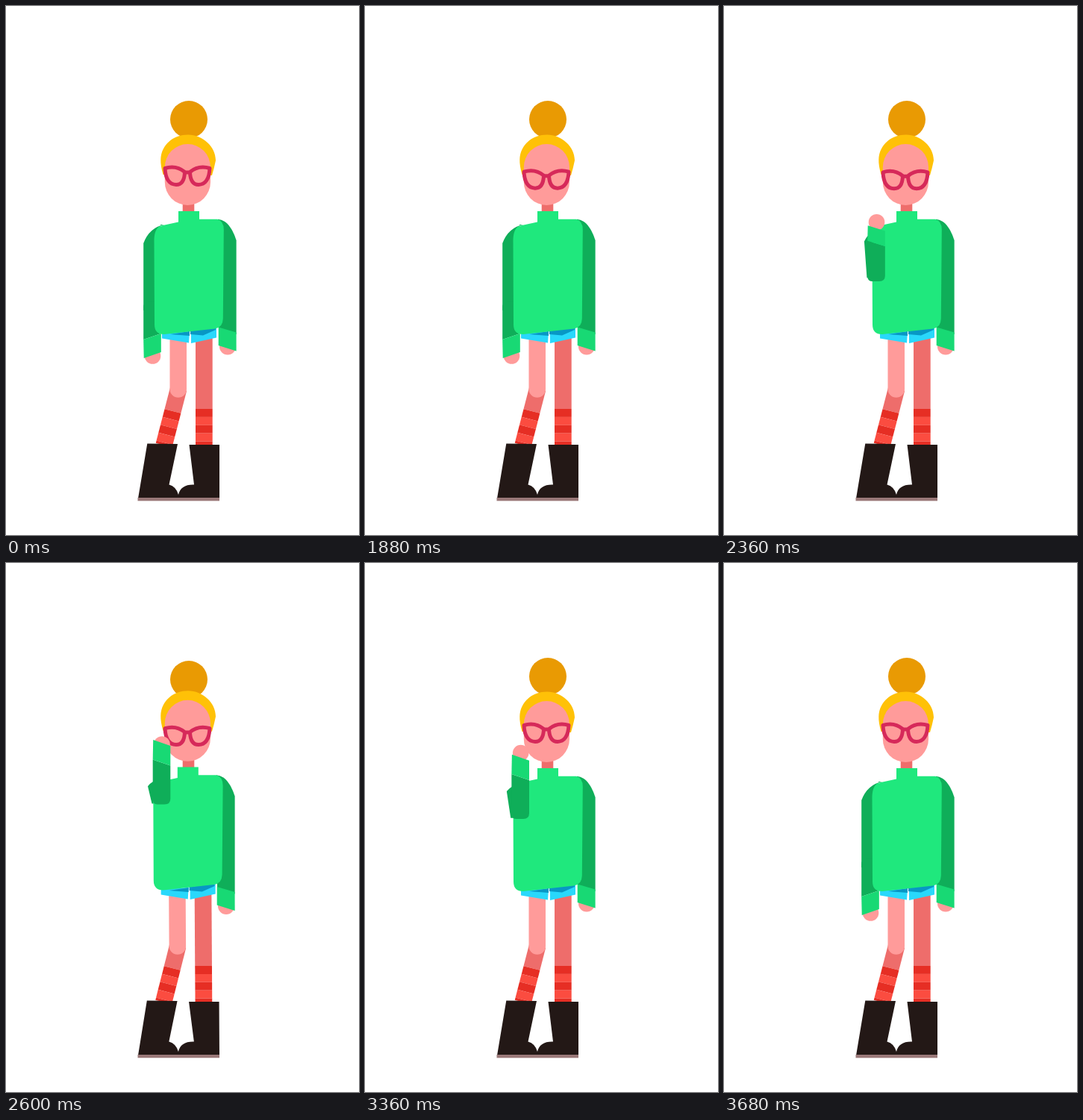
Write an HTML page with a canvas that moves like this. It is 473 px wide and 709 px high and loops after 3.84 s.

```html
<!DOCTYPE html>
<html lang="en">
<head>
<meta charset="utf-8">
<title>Pushing up the glasses</title>
<style>
  html, body { margin: 0; overflow: hidden; background: #fff; }
  canvas { display: block; }
</style>
</head>
<body>
<canvas id="stage" width="473" height="709"></canvas>
<script>
const ctx = document.getElementById('stage').getContext('2d');
const LOOP = 3840, STEP = 40;
const SKIN = '#ff9b9a', SHADE = '#ee6d6b', GREEN = '#1fe87d', DARK = '#0fae59',
      CUFF = '#18d974', RED = '#e62e24', CORAL = '#fb4c40', BOOT = '#231816',
      PINK = '#d6295a', CYAN = '#29d8fb', BLUE = '#0897c4';

const mix = (a, b, k) => a + (b - a) * k;
const clamp = (v, lo, hi) => Math.min(hi, Math.max(lo, v));
const smooth = k => k * k * (3 - 2 * k);
const easeOut = k => 1 - (1 - k) ** 1.8;
const ramp = (t, from, to, ease = smooth) => ease(clamp((t - from) / (to - from), 0, 1));

function fill(color, path) {
  ctx.fillStyle = color;
  ctx.fill(new Path2D(path));
}

function rect(color, x, y, w, h) {
  ctx.fillStyle = color;
  ctx.fillRect(x, y, w, h);
}

function disc(color, x, y, r) {
  ctx.fillStyle = color;
  ctx.beginPath();
  ctx.arc(x, y, r, 0, 7);
  ctx.fill();
}

function shifted(x, y, draw) {
  ctx.save();
  ctx.translate(x, y);
  draw();
  ctx.restore();
}

function sock(x, y, w, end) {
  for (let i = 0; y < end; i++, y += 10.9)
    rect(i % 2 ? CORAL : RED, x, y, w, Math.min(10.9, end - y));
}

// The legs lean about the soles.
function legs(sway) {
  ctx.save();
  const skew = .006 * sway;
  ctx.transform(1, 0, skew, 1, -skew * 663, 0);
  rect(SHADE, 254, 440, 22.7, 100);
  sock(254, 540, 22.7, 590);

  shifted(231.2, 513, () => {
    ctx.rotate(.253);
    rect(SHADE, -11.3, 0, 22.6, 31);
    sock(-11.3, 31, 22.6, 78);
  });
  fill(SKIN, 'M219.5 440H242V513.5A11.25 11.25 0 0 1 219.5 513.5Z');

  shifted(0, -sway, () => {
    fill(CYAN, 'M209 438L246 436L245 451.5L209 445.5ZM248 437L282 431V444.5L248 452Z');
    fill(BLUE, 'M220 440L246 436V442ZM247 435L281 431V434L264 441.5L247 440Z');
  });

  fill(BOOT, 'M189.3 586.5L230 587L218.5 641.5Q228 644 231 655Q234 641 252 641.5' +
    'L245.5 588H286V660H177Z');
  rect('#9a7878', 176.5, 659, 109.5, 4.3);
  ctx.restore();
}

// The forearm swings up towards the viewer: reach is its visible length, +1 down to -1 up.
function armPose(raise, push) {
  const reach = Math.cos(Math.PI * raise);
  const fold = raise ** 2.6;
  const elbow = mix(408, 329.5, fold) - 17.5 * push;
  const along = (down, up) => elbow + reach * (reach > 0 ? down : up);
  return {
    reach, fold, elbow,
    x: mix(196, 208.5, fold),
    start: along(35, 44.5),
    end: along(60, 71) + 6 * Math.sin(Math.PI * raise),
    hand: along(61, 77) + 8 * push,
    slant: -4 * reach
  };
}

function upperArm({ elbow, fold }) {
  const y = mix(318, 305 - (329.5 - elbow) * .33, fold);
  const top = mix(293, y - 9, fold), end = elbow + 10.5 * fold;
  const x = mix(184.2, 190, fold), foot = mix(184.2, 195.5, fold);
  fill(DARK, `M${mix(212, 206, fold)} ${top}Q${mix(192, 196, fold)} ${mix(297, top + 1, fold)}` +
    ` ${x} ${y}L${foot} ${end}H207V${top}Z`);
}

function forearm({ x, elbow, start, end, hand, slant, reach }) {
  const l = x - 11.8, r = x + 11.8;
  const s = clamp(reach * 3.5, -1, 1);
  const front = clamp((.85 - Math.abs(reach)) / .4, 0, 1);
  const tip = elbow - s * 11.5, bend = elbow - s * 4;
  const drawHand = () => disc(SKIN, x + .5, hand, 10.8);

  if (front < .4) drawHand();
  fill(DARK, `M${l} ${start - slant}L${l} ${bend}Q${l} ${tip} ${x - 6} ${tip}` +
    `H${x + 4}Q${r} ${tip} ${r} ${bend}L${r} ${start + slant}Z`);
  fill(CUFF, `M${l} ${start - slant}Q${x} ${start - s * front * 26} ${r} ${start + slant}` +
    `L${r} ${end + slant}L${l + .5} ${end - slant}Z`);
  if (front >= .4) drawHand();
}

function rightArm(sway) {
  const drop = 5 * sway;
  shifted(-.8 * sway, 0, () => {
    fill(DARK, `M284 285.7C297 287 304 300 308.6 314V${440 + drop}L285 ${433 + drop}Z`);
    ctx.translate(0, drop);
    disc(SKIN, 297, 456.5, 11);
    fill(CUFF, 'M284.7 430.5L308.6 437.5V462.5L284.7 455Z');
  });
}

function sweater(sway) {
  shifted(-1.2 * sway, -1.5 * sway, () => {
    rightArm(sway);
    fill(GREEN, 'M231 275H259V285.7H283Q292 288 291.8 300L290.8 419Q290.5 431 280 432.5' +
      'L212 440Q199 440 199 427L198.5 313Q199 297 208 294.5L231 289.5Z');
  });
}

function head(sway, push, slide) {
  disc('#e99a03', 245, 152 + 5 * push - sway, 25);
  shifted(0, -1.2 * sway, () => {
    fill('#ffc107', 'M210.5 226Q207 214 207.3 206C208 185 225 172.5 244 172.5' +
      'S281 188 281 207Q279 217 276 227Z');
    fill(SKIN, 'M212.8 216A30.6 31 0 0 1 274 216V236A30.6 31 0 0 1 212.8 236Z');
    ctx.translate(0, 5.3 * slide);
    ctx.strokeStyle = PINK;
    ctx.lineWidth = 5;
    ctx.lineJoin = ctx.lineCap = 'round';
    ctx.stroke(new Path2D('M213 217.5Q228 213 239.5 222.5Q239 239.5 228 239.5Q214 239 213 217.5Z' +
      'M273 217.5Q258 213 246.5 222.5Q247 239.5 258 239.5Q272 239 273 217.5ZM239.5 223H246.5'));
  });
}

function draw(t) {
  const raise = ramp(t, 2000, 2560, easeOut) - ramp(t, 3340, 3680);
  const pressed = ramp(t, 2360, 2600), released = ramp(t, 2600, 2800), settled = ramp(t, 2800, 2920);
  const sway = pressed - settled;
  const push = pressed - 1.2 * released + .2 * settled;
  const slide = ramp(t, 1440, 2000) - released;
  const arm = armPose(raise, push);
  ctx.clearRect(0, 0, 473, 709);

  legs(sway);
  rect(SHADE, 236.7, 262, 15.6, 16);
  upperArm(arm);
  if (raise <= 0) forearm(arm);
  sweater(sway);
  head(sway, push, slide);
  if (raise > 0) forearm(arm);
}

const begin = performance.now();
function tick() {
  const t = (performance.now() - begin) % LOOP;
  draw(Math.floor(t / STEP) * STEP);
  requestAnimationFrame(tick);
}
tick();
</script>
</body>
</html>
```
